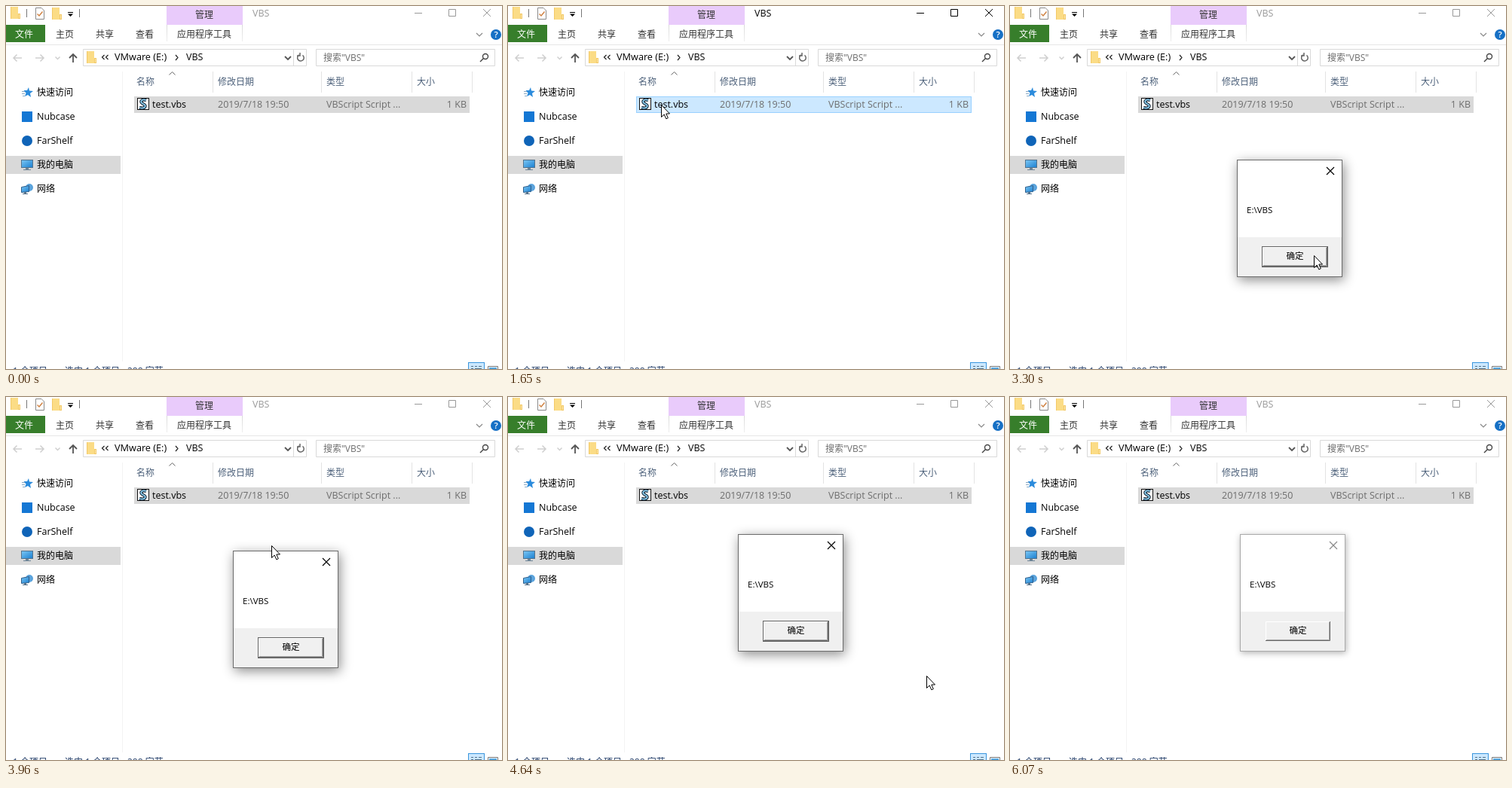
Recreate the animation shown at these times as an HTML page. Size 658x482 px, loop 6180 ms.

```html
<!DOCTYPE html>
<html lang="zh-CN">
<head>
<meta charset="utf-8">
<title>VBS</title>
<style>
  html, body { margin: 0; width: 100%; height: 100%; overflow: hidden; background: #fff; }
  svg { display: block; font: 12.5px "Open Sans", "Noto Sans CJK SC", "Noto Sans CJK", sans-serif; }
  text { white-space: pre; }
  .cn { font-size: 12px; }
  .line { fill: none; stroke: currentColor; }
  .head { fill: #4c607a; color: #e3e3e3; }
  .meta { fill: #6d6d6d; }
  .chrome { color: #999; }
  .chrome.active { color: #000; }
  .row { fill: #d9d9d9; stroke: #d9d9d9; }
  .row.hover { fill: #cce8ff; stroke: #99d1ff; }
  .box { fill: #fff; stroke: #6b6b6b; filter: drop-shadow(2px 4px 8px rgba(0,0,0,.45)); }
  .ring { fill: #f0f0f0; stroke: #646464; }
  .inactive .box { stroke: #aaa; filter: drop-shadow(1px 2px 4px rgba(0,0,0,.3)); }
  .inactive .ring { stroke: #f0f0f0; }
  .inactive .close { color: #888; }
</style>
</head>
<body>
<svg width="658" height="482" viewBox="0 0 658 482">
  <defs>
    <g id="folder">
      <path d="M0 0H10V9H13V16H0Z" fill="#fbdc86"/>
      <path d="M0 0H1V16H0ZM10 9H13V16H10Z" fill="#f2c968"/>
      <path d="M11 10H12V15H11Z" fill="#ffe9ae"/>
    </g>
    <linearGradient id="fade" x2="0" y2="1">
      <stop stop-color="#d9d9d9"/><stop offset="1" stop-color="#eee"/>
    </linearGradient>
    <linearGradient id="screen" x2="1" y2="1">
      <stop stop-color="#7cc8f5"/><stop offset="1" stop-color="#1b7fd0"/>
    </linearGradient>
  </defs>

  <!-- title bar and ribbon -->
  <use href="#folder" x="6" y="1"/>
  <use href="#folder" x="61" y="2"/>
  <path class="line" color="#777" d="M27.5 4V15M97.5 4V15"/>
  <path d="M39.5 2.5H47L50.5 6V17.5H39.5Z" fill="#fff" stroke="#8a8a8a"/>
  <path class="line" color="#cf8243" stroke-width="1.5" d="M41.5 10.5L44 13L48.5 7.5"/>
  <path d="M82 8H89V9H82ZM82 10.5H89L85.5 14Z"/>
  <rect x="213" width="101" height="25" fill="#e9cbfb"/>
  <text class="cn" x="251" y="16" fill="#333">管理</text>
  <g class="chrome" id="chrome">
    <text x="327" y="14" fill="currentColor">VBS</text>
    <path class="line" d="M542 9.5H552M587.5 4.5H596.5V13.5H587.5ZM633 4L643 14M643 4L633 14"/>
  </g>
  <rect y="25" width="52" height="23" fill="#377e2b"/>
  <path d="M213 25h1v22h-1zM313 25h1v22h-1z" fill="url(#fade)"/>
  <path class="line" color="#e6e6e6" d="M0 51.5H658"/>
  <g class="cn" fill="#333">
    <text x="12" y="42" fill="#fff">文件</text>
    <text x="66" y="42">主页</text>
    <text x="119" y="42">共享</text>
    <text x="172" y="42">查看</text>
    <text x="227" y="42">应用程序工具</text>
  </g>
  <path class="line" color="#888" stroke-width="1.2" d="M624 36L628 40L632 36"/>
  <circle cx="650" cy="38" r="7" fill="#1670c5"/>
  <text x="650" y="42" fill="#fff" font-weight="600" font-size="11.5" text-anchor="middle">?</text>

  <!-- navigation -->
  <path class="line" color="#cfcfcf" stroke-width="1.5" d="M21 69H10M14.5 64.5L10 69L14.5 73.5M39 69H50M45.5 64.5L50 69L45.5 73.5M65.5 67.5L68.5 70.5L71.5 67.5"/>
  <path class="line" color="#555" stroke-width="1.8" d="M89 75V64M84 69L89 64L94 69"/>
  <path class="line" color="#d9d9d9" d="M102.5 57.5H398.5V79.5H102.5ZM381.5 57.5V79.5M411.5 57.5H648.5V79.5H411.5Z"/>
  <use href="#folder" x="107" y="60"/>
  <path class="line" color="#222" stroke-width="1.2" d="M130.5 65L127.5 68L130.5 71M135.5 65L132.5 68L135.5 71M225 65L228 68.5L225 72"/>
  <text x="144" y="72" font-size="12.7">VMware (E:)</text>
  <text x="239" y="72">VBS</text>
  <path class="line" color="#555" stroke-width="1.8" d="M370 67L374 71L378 67"/>
  <path class="line" color="#666" stroke-width="1.5" d="M393.5 65.3A4.3 4.3 0 1 1 389 64.9M390 62V66H386"/>
  <text x="421" y="73" class="cn" fill="#6d6d6d">搜索"VBS"</text>
  <path class="line" color="#444" stroke-width="1.5" d="M629 74L633.5 69.5"/>
  <circle class="line" color="#444" stroke-width="1.4" cx="636" cy="67" r="3.5"/>

  <!-- sidebar -->
  <rect y="199" width="152" height="24" fill="#d9d9d9"/>
  <path class="line" color="#f3f3f3" d="M154.5 87V472"/>
  <path d="M30 108L31 112.5L36 113L32 116L33 121L29 118L25 120L26.5 115.5L23.5 112H28Z" fill="#2b8bdc"/>
  <path class="line" color="#8aa9c4" d="M21 113.5H25M21 116.5H25M22 119.5H25"/>
  <rect x="21" y="140" width="14" height="14" fill="#1477d4"/>
  <circle cx="28" cy="179" r="7" fill="#0f64b8"/>
  <rect x="20.5" y="204.5" width="15" height="10" fill="url(#screen)" stroke="#53748f"/>
  <path d="M26 215h4v2h3v1H23v-1h3z" fill="#6d8496"/>
  <circle cx="31" cy="241" r="5" fill="#5ba3dc"/>
  <path d="M20.5 240.5L30.5 238.5V246.5L20.5 247.5Z" fill="url(#screen)" stroke="#315f8a"/>
  <path d="M24 247h3v2h2v1H22v-1h2z" fill="#58748c"/>
  <g class="cn">
    <text x="41" y="119">快速访问</text>
    <text x="41" y="151" font-size="12.5">Nubcase</text>
    <text x="41" y="183" font-size="12.5">FarShelf</text>
    <text x="41" y="215">我的电脑</text>
    <text x="41" y="247">网络</text>
  </g>

  <!-- file list -->
  <g class="cn head">
    <path class="line" d="M274.5 87V115M418.5 87V115M538.5 87V115M618.5 87V115"/>
    <path class="line" color="#666" d="M216.5 91.5L220.5 87.5L224.5 91.5"/>
    <text x="173" y="105">名称</text>
    <text x="281" y="105">修改日期</text>
    <text x="425" y="105">类型</text>
    <text x="545" y="105">大小</text>
  </g>
  <rect class="row" id="row" x="170.5" y="120.5" width="444" height="21"/>
  <rect x="174.5" y="122.5" width="15" height="15" fill="#fff" stroke="#111"/>
  <path class="line" color="#123" stroke-width="4" d="M186 125C179 123 177 128 182 130S185 137 177 135"/>
  <path class="line" color="#8fd3f5" stroke-width="1.8" d="M186 125C179 123 177 128 182 130S185 137 177 135"/>
  <text x="194" y="135">test.vbs</text>
  <g class="meta">
    <text x="281" y="135">2019/7/18 19:50</text>
    <text x="425" y="135">VBScript Script ...</text>
    <text x="611" y="135" text-anchor="end">1 KB</text>
  </g>

  <!-- status bar -->
  <g class="cn" fill="#26406b">
    <text x="9" y="489">1 个项目</text>
    <text x="78" y="489">选中 1 个项目</text>
    <text x="161" y="489">288 字节</text>
  </g>
  <rect x="613.5" y="473.5" width="21" height="14" fill="#cce8ff" stroke="#3a96dd"/>
  <path class="line" color="#54728c" d="M617 478.5H620M622 478.5H625M627 478.5H631M617 481.5H620M622 481.5H631"/>
  <path d="M639.5 478.5H652.5V488H639.5Z" fill="#fff" stroke="#777"/>
  <path d="M641 480h10v2h-10z" fill="#55a4dc"/>

  <g id="dialog">
    <rect class="box" x=".5" y=".5" width="139" height="155"/>
    <path d="M1 103H139V155H1Z" fill="#f0f0f0"/>
    <path class="line close" stroke-width="1.2" d="M119 10L129 20M129 10L119 20"/>
    <text x="13" y="71" font-size="11.5">E:\VBS</text>
    <rect class="ring" x="33.5" y="115.5" width="87" height="27"/>
    <path class="line" color="#fff" d="M34.5 141V116.5H119"/>
    <path class="line" color="#696969" d="M34 141.5H119.5V116"/>
    <path class="line" color="#a5a5a5" d="M35 140.5H118.5V117"/>
    <text x="77" y="132" font-size="11.5" text-anchor="middle">确定</text>
  </g>

  <g id="pointer">
    <circle id="glow" r="12" fill="#ffff3c" opacity=".8"/>
    <path d="M.5 .5V16.5L4.2 13L6.8 18.8L9.3 17.7L6.8 12H11.5Z" fill="#fff" stroke="#000"/>
  </g>
</svg>
<script>
const LOOP = 6180;
const OPEN = 2090, CLOSE = 6070;
const GRAB = [366, 209], HOME = [301, 204];
const [chrome, row, dialog, pointer, glow] =
  ['chrome', 'row', 'dialog', 'pointer', 'glow'].map(id => document.getElementById(id));

// Pointer moves: start, end, number of steps, then start, control and end point.
const moves = [
  [200, 760, 6, [330, 391], [235, 200], [208, 134]],
  [880, 880, 1, [203, 131]],
  [2740, 3300, 6, [206, 138], [300, 215], [403, 331]],
  [3420, 3960, 6, [422, 336], [400, 265], [352, 197]],
  [4080, 4080, 1, GRAB],
  [4180, 4180, 1, [329, 185]],
  [4300, 4300, 1, [370, 187]],
  [4420, 4640, 3, [370, 187], [455, 282], [555, 370]],
  [4740, 4740, 1, [611, 463]],
  [4860, 4860, 1, null],
  [5390, 5616, 3, [550, 454], [470, 355], [435, 355]],
  [5730, 5730, 1, null]
];

const between = (t, from, to) => t >= from && t < to;

function pointerAt(t) {
  const move = moves.findLast(m => m[0] <= t);
  if (!move) return null;
  const [start, end, steps, a, b, c] = move;
  if (steps === 1) return a;
  const last = steps - 1;
  const p = Math.min(last, Math.floor((t - start) / (end - start) * last + 1e-6)) / last;
  const q = 1 - p;
  return a.map((v, i) => q * q * v + 2 * q * p * b[i] + p * p * c[i]);
}

function dialogAt(t) {
  const held = t < 4080 ? GRAB : pointerAt(Math.min(t, 4300));
  return HOME.map((v, i) => v + held[i] - GRAB[i]);
}

function draw(t) {
  const at = pointerAt(t);
  pointer.style.display = at ? '' : 'none';
  if (at) pointer.setAttribute('transform', `translate(${at.map(Math.round)})`);
  glow.style.display = between(t, 1430, 1650) || between(t, 4080, 4420) ? '' : 'none';

  chrome.classList.toggle('active', between(t, 1430, OPEN));
  row.classList.toggle('hover', Boolean(at) && between(at[1], 120, 142) && at[0] < 615);

  dialog.style.display = t < OPEN ? 'none' : '';
  if (t >= OPEN) {
    const shown = Math.min(2, Math.floor((t - OPEN) / 110)) / 2;
    const scale = 0.92 + 0.08 * shown;
    dialog.setAttribute('transform',
      `translate(${dialogAt(t)}) translate(70 78) scale(${scale}) translate(-70 -78)`);
    dialog.setAttribute('opacity', 0.4 + 0.6 * shown);
  }
  dialog.classList.toggle('inactive', t >= CLOSE);
}

const begin = performance.now();
function tick() {
  draw((performance.now() - begin) % LOOP);
  requestAnimationFrame(tick);
}
tick();
</script>
</body>
</html>
```
